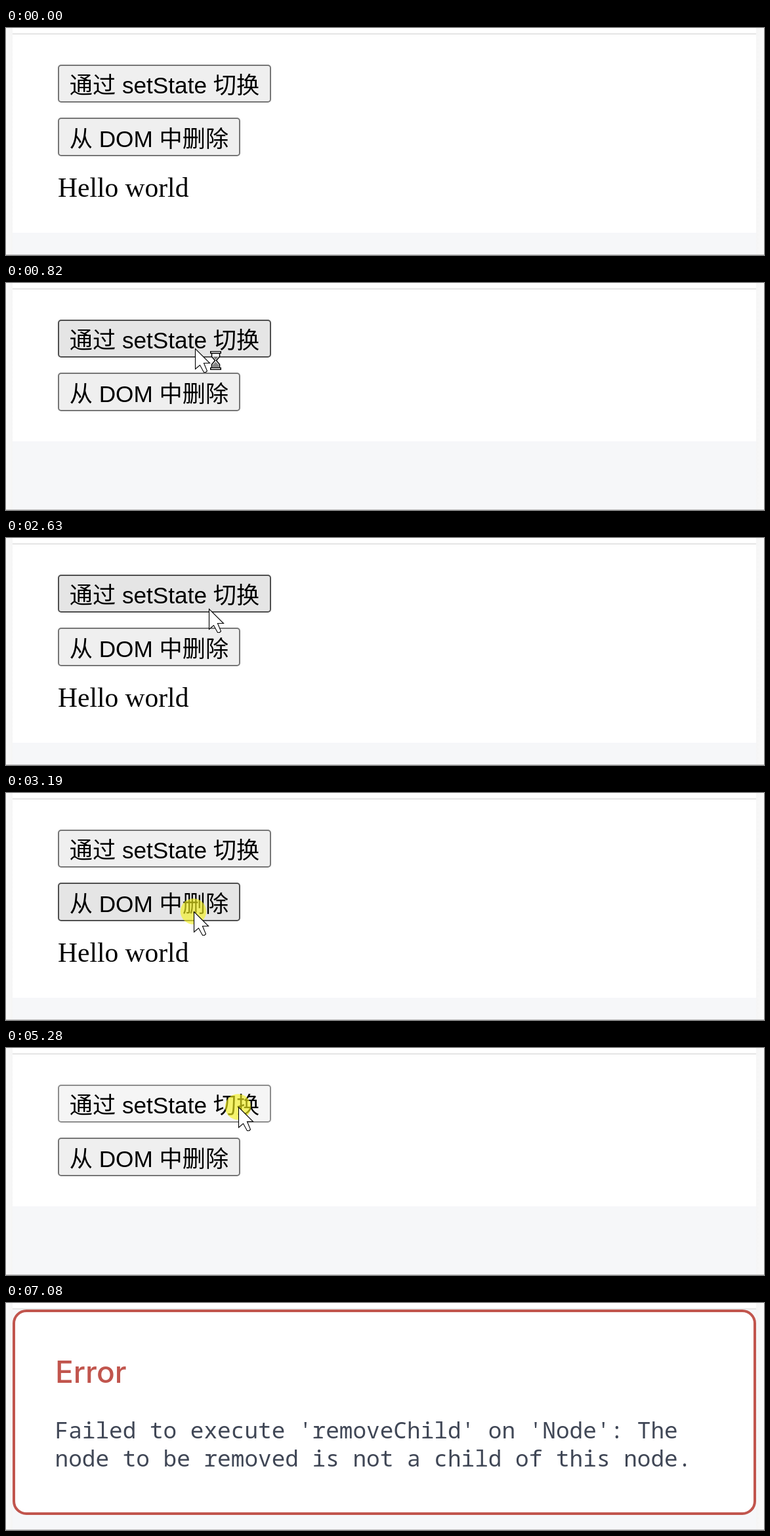
An HTML page with a canvas that plays this animation: 1155x347 px, repeating every 7880 ms.

```html
<!DOCTYPE html>
<html lang="zh">
<head>
<meta charset="utf-8">
<title>removeChild demo</title>
<style>
  html, body { margin: 0; width: 100%; height: 100%; overflow: hidden; background: #fff; }
  canvas { display: block; width: 1155px; height: 347px; }
</style>
</head>
<body>
<canvas id="stage" width="1155" height="347"></canvas>
<script>
const ctx = document.getElementById('stage').getContext('2d');
const W = 1155, H = 347, LOOP = 7880, STEP = 69;

const UI_FONT = '35.2px "Liberation Sans", "Noto Sans CJK SC", "Noto Sans CJK", sans-serif';
const SERIF = '41.5px "Liberation Serif", serif';
const TITLE = '500 46px Inter, sans-serif';
const MONO = '34.4px "Noto Sans Mono", monospace';

const toggle = { x: 79, y: 56, w: 325, h: 58, label: '通过 setState 切换', base: 99.5 };
const remove = { x: 79, y: 137, w: 278, h: 59, label: '从 DOM 中删除', base: 181.5 };

const LOOKS = {
  idle: ['#efefef', '#767676'],
  hover: ['#e5e5e5', '#4f4f4f'],
  active: ['#f5f5f5', '#8d8d8d']
};

const easeIn = p => p * p;
const easeOut = p => 1 - (1 - p) * (1 - p);
const easeInOut = p => p * p * (3 - 2 * p);

// Pointer moves; "lead" is the progress already made at the first step.
const moves = [
  { at: 130, n: 7, lead: 0, from: [813, 291], to: [288, 100], ease: easeOut },
  { at: 950, n: 4, lead: 1, from: [288, 100], to: [317, 82], ease: easeInOut },
  { at: 2560, n: 6, lead: 1, from: [317, 82], to: [286, 181], ease: easeInOut },
  { at: 3750, n: 6, lead: 1, from: [286, 181], to: [354, 90], ease: easeInOut },
  { at: 6740, n: 5, lead: 1, from: [354, 90], to: [1086, 304], ease: easeIn }
];

const between = (t, a, b) => t >= a && t < b;

function pointerAt(t) {
  if (!between(t, 130, 7080)) return null;
  const m = moves.filter(v => t >= v.at).pop();
  const k = Math.floor((t - m.at) / STEP + 0.03) + m.lead;
  const p = m.ease(Math.min(1, k / m.n));
  return m.from.map((v, i) => Math.round(v + (m.to[i] - v) * p));
}

const isClick = t => between(t, 682, 820) || between(t, 1830, 1960) ||
  between(t, 3190, 3330) || between(t, 5280, 5410);
const isPressed = t => isClick(t) && !between(t, 3190, 3270);
const hasHello = t => t < 820 || between(t, 1960, 3330);

function rect(x, y, w, h, color) {
  ctx.fillStyle = color;
  ctx.fillRect(x, y, w, h);
}

function text(str, x, y, font, color) {
  ctx.font = font;
  ctx.fillStyle = color;
  ctx.fillText(str, x, y);
}

function box(x, y, w, h, r, line, fill, stroke) {
  ctx.beginPath();
  ctx.roundRect(x + line / 2, y + line / 2, w - line, h - line, r);
  ctx.fillStyle = fill;
  ctx.fill();
  ctx.lineWidth = line;
  ctx.strokeStyle = stroke;
  ctx.stroke();
}

function poly(points, fill) {
  ctx.beginPath();
  points.forEach(([x, y]) => ctx.lineTo(x + 0.5, y + 0.5));
  ctx.closePath();
  ctx.fillStyle = fill;
  ctx.fill();
}

function drawEdge(x, w, a, b) {
  const g = ctx.createLinearGradient(x, 0, x + w, 0);
  g.addColorStop(0, a);
  g.addColorStop(1, b);
  rect(x, 0, w, H, g);
}

function drawPage(bottom) {
  rect(0, 0, W, H, '#fff');
  rect(10, bottom, 1133, H - bottom, '#f6f7f9');
  drawEdge(0, 10, '#fafafa', '#f5f5f5');
  drawEdge(1143, 12, '#f5f5f5', '#fafafa');
  rect(10, 8, 1133, 2, '#e5e5e5');
}

function drawButton(b, pos, pressed) {
  const over = pos && between(pos[0], b.x, b.x + b.w) && between(pos[1], b.y, b.y + b.h);
  const [fill, stroke] = LOOKS[over ? (pressed ? 'active' : 'hover') : 'idle'];
  box(b.x, b.y, b.w, b.h, 4, 2, fill, stroke);
  text(b.label, b.x + 17.75, b.base, UI_FONT, '#000');
}

function drawError() {
  box(10, 10, 1133, 314, 19, 4, '#fff', '#c1554d');
  text('Error', 75, 122, TITLE, '#c1554d');
  text("Failed to execute 'removeChild' on 'Node': The", 74.5, 207, MONO, '#404756');
  text('node to be removed is not a child of this node.', 74.5, 250, MONO, '#404756');
}

function drawHourglass(x, y) {
  ctx.save();
  ctx.translate(x, y);
  ctx.lineWidth = 1.5;
  ctx.strokeStyle = '#000';
  poly([[2, 3], [14, 3], [14, 8], [9, 14], [14, 20], [14, 25], [2, 25], [2, 20], [7, 14], [2, 8]], '#fff');
  ctx.stroke();
  poly([[4, 8], [12, 8], [8, 13]], '#777');
  poly([[8, 16], [13, 21], [13, 25], [3, 25], [3, 21]], '#888');
  for (const top of [0, 25]) {
    rect(0, top, 17, 4, '#000');
    rect(1.5, top + 1.2, 14, 1.4, '#fff');
  }
  ctx.restore();
}

function drawPointer([x, y], clicked, busy) {
  if (clicked) {
    ctx.beginPath();
    ctx.arc(x - 0.5, y, 19.7, 0, Math.PI * 2);
    ctx.fillStyle = 'rgba(246, 242, 30, 0.63)';
    ctx.fill();
  }
  ctx.save();
  ctx.translate(x, y);
  poly([[0, 0], [0, 31], [7, 25], [13, 36], [16, 36], [18, 34], [13, 22], [22, 22]], '#fff');
  ctx.lineWidth = 1.1;
  ctx.strokeStyle = '#000';
  ctx.stroke();
  ctx.restore();
  if (busy) drawHourglass(x + 23, y + 4);
}

function draw(t) {
  const pos = pointerAt(t);
  const hello = hasHello(t);
  drawPage(hello ? 313 : 242);
  if (t >= 5810) {
    rect(10, 10, 1133, H - 10, '#f6f7f9');
    drawError();
  } else if (t < 5410) {
    drawButton(toggle, pos, isPressed(t));
    drawButton(remove, pos, isPressed(t));
    if (hello) text('Hello world', 79, 257.5, SERIF, '#000');
  }
  rect(0, 346, W, 1, '#c0c0c0');
  if (pos) drawPointer(pos, isClick(t), t < 950);
}

const start = performance.now();
function tick() {
  draw((performance.now() - start) % LOOP);
  requestAnimationFrame(tick);
}
tick();
</script>
</body>
</html>
```
